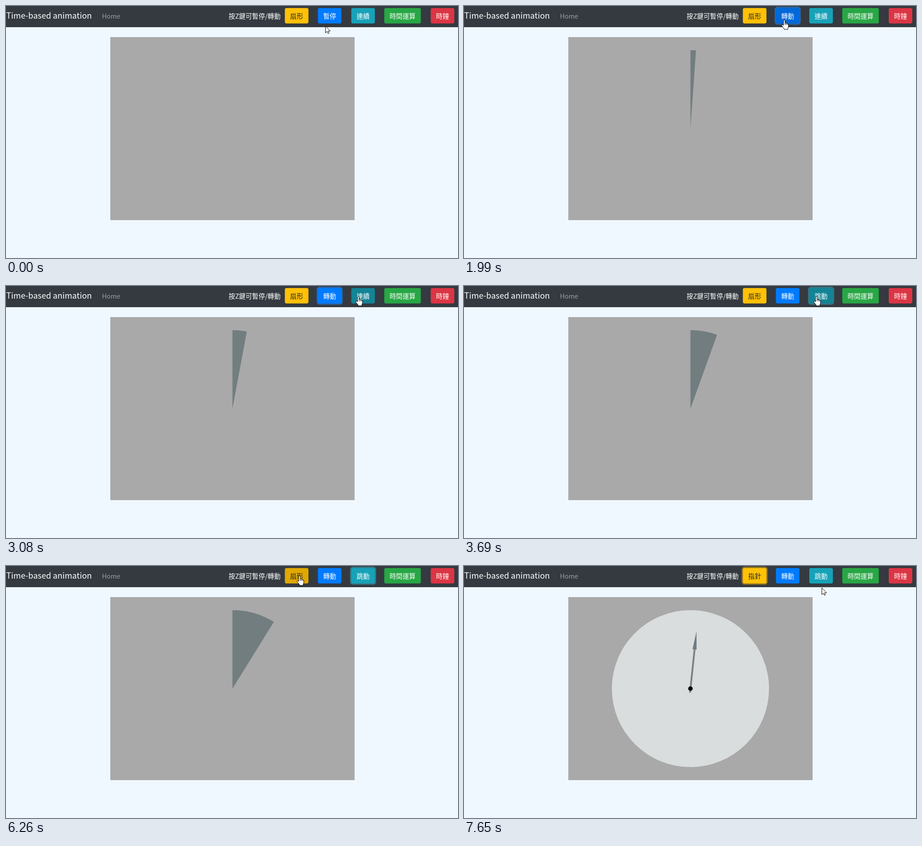
An HTML page that plays this animation: 1001x559 px, repeating every 8 s.

```html
<!DOCTYPE html>
<html lang="zh-Hant">
<head>
<meta charset="utf-8">
<title>Time-based animation</title>
<style>
html, body { margin: 0; width: 100%; height: 100%; overflow: hidden; background: #f0f8ff; }
svg { display: block; width: 1001px; height: 559px; }
text { font: 400 14.4px "Noto Sans CJK TC", "Noto Sans CJK SC", "Noto Sans CJK JP", "Noto Sans", sans-serif; fill: #fff; white-space: pre; }
.medium text, text.medium { font-weight: 500; }
.brand { font-size: 18px; }
.buttons text { text-anchor: middle; }
</style>
</head>
<body>
<svg viewBox="0 0 1001 559">
  <rect width="1001" height="559" fill="#f0f8ff"/>
  <rect width="1001" height="47" fill="#343a40"/>
  <text class="brand" x="0.5" y="28">Time-based animation</text>
  <text x="212.5" y="28" fill-opacity=".5">Home</text>
  <text class="medium" x="493" y="28">按Z鍵可暫停/轉動</text>
  <g class="buttons medium" id="buttons"></g>
  <rect x="231" y="69" width="541" height="406" fill="#a9a9a9"/>
  <path id="sector" fill="#727d80"/>
  <g id="clock">
    <circle cx="501.5" cy="272" r="174" fill="#d9dddd"/>
    <g id="hand">
      <path d="M501.5 281V184" stroke="#828080" stroke-width="4"/>
      <path d="M501.5 144L506 184.500H497Z" fill="#6f7c81"/>
    </g>
    <circle cx="501.5" cy="272" r="5" fill="#000"/>
  </g>
  <g id="cursor" fill="#fff" stroke="#000" stroke-linejoin="round">
    <path id="arrow" d="M.5 .5V15.500L4 12.300L6.200 17L8.500 16L6.300 11.500H11Z"/>
    <path id="pointer" d="M-1.500 12V1.500a1.700 1.700 0 0 1 3.400 0V7q1.600-1.200 3 .6q1.600-.8 2.700 .8q1.800-.4 2 1.600V14q0 2-1.500 4.500V21H0V19.500Q-4 14-5.500 12.500q-.6-2.300 1.400-2Q-2.500 11-1.500 12ZM1.900 7v4M4.900 8v3M7.600 9v2"/>
  </g>
</svg>
<script>
const LOOP = 8000, FADE = 150, TICK = 77.3, FIRST_TICK = 520;
const CX = 501.5, CY = 272, RADIUS = 174;
const TOP = 4.5, HEIGHT = 34.2;
const $ = id => document.getElementById(id);

// fill and ring: [time, value] with a short fade; labels: [time, text] without one
const buttons = [
  { x: 617.6, w: 52.2, ink: '#212529', glow: '222,170,12',
    labels: [[0, '扇形'], [6300, '指針']],
    fill: [[0, 'ffc107'], [5900, 'e0a800'], [6245, 'd39e00'], [6320, 'e0a800'], [6962, 'ffc107']],
    ring: [[0, 0], [6245, 1]] },
  { x: 690.7, w: 52.2, glow: '38,143,255',
    labels: [[0, '暫停'], [1300, '轉動']],
    fill: [[0, '007bff'], [580, '0069d9'], [1205, '0062cc'], [1300, '0069d9'], [2400, '007bff'],
      [5765, '0069d9'], [5880, '007bff'], [7080, '0069d9'], [7365, '007bff']],
    ring: [[0, 0], [1205, 1], [3450, 0]] },
  { x: 764.7, w: 52.2, glow: '58,176,195',
    labels: [[0, '連續'], [3530, '跳動']],
    fill: [[0, '17a2b8'], [2532, '138496'], [3450, '117a8b'], [3530, '138496'], [5715, '17a2b8']],
    ring: [[0, 0], [3450, 1], [6245, 0]] },
  { x: 837.7, w: 81, labels: [[0, '時間運算']], fill: [[0, '28a745']], ring: [[0, 0]] },
  { x: 940.6, w: 52.2, labels: [[0, '時鐘']], fill: [[0, 'dc3545']], ring: [[0, 0]] }
];

const mousePath = [
  [0, 707, 44], [480, 707, 44], [560, 709, 33], [640, 709, 31],
  [2200, 709, 31], [2620, 780, 23],
  [5620, 780, 23], [5699, 772, 22], [5960, 650, 22],
  [6850, 650, 22], [7625, 792, 48]
];

const mix = (a, b, k) => a + (b - a) * k;
const clamp = k => Math.max(0, Math.min(1, k));
const rgb = hex => [0, 2, 4].map(i => parseInt(hex.slice(i, i + 2), 16));
const lastIndex = (steps, t) => steps.filter(s => s[0] <= t).length - 1;

function fade(steps, t, blend) {
  const i = lastIndex(steps, t);
  const previous = steps[Math.max(0, i - 1)][1];
  return blend(previous, steps[i][1], clamp((t - steps[i][0]) / FADE));
}

function mixColor(a, b, k) {
  const to = rgb(b);
  return `rgb(${rgb(a).map((v, i) => Math.round(mix(v, to[i], k)))})`;
}

function mouseAt(t) {
  const i = lastIndex(mousePath, t);
  const a = mousePath[i], b = mousePath[i + 1] || a;
  const k = a === b ? 0 : (t - a[0]) / (b[0] - a[0]);
  return [mix(a[1], b[1], k), mix(a[2], b[2], k)];
}

function add(tag, attrs) {
  const el = document.createElementNS('http://www.w3.org/2000/svg', tag);
  return $('buttons').appendChild(set(el, attrs));
}

function set(el, attrs) {
  for (const name in attrs) el.setAttribute(name, attrs[name]);
  return el;
}

for (const b of buttons) {
  b.halo = add('rect', { fill: `rgba(${b.glow || '0,0,0'},.5)` });
  b.box = add('rect', { x: b.x, y: TOP, width: b.w, height: HEIGHT, rx: 3.6 });
  b.text = add('text', { x: b.x + b.w / 2, y: 28 });
  b.text.style.fill = b.ink || '#fff';
}

function drawButton(b, t) {
  const ring = fade(b.ring, t, mix), spread = 2.88 * ring;
  set(b.halo, {
    x: b.x - spread, y: TOP - spread, rx: 3.6 + spread, opacity: ring,
    width: b.w + 2 * spread, height: HEIGHT + 2 * spread
  });
  set(b.box, { fill: fade(b.fill, t, mixColor) });
  b.text.textContent = b.labels[lastIndex(b.labels, t)][1];
}

// Smooth 6° per second first, then one 6° jump each second
function sectorAngle(t) {
  if (t < 3650) return Math.max(0, (t - 1315) * 0.006);
  return 19.8 + 6 * Math.floor((t - 3650) / 1010);
}

function drawSector(t) {
  const a = sectorAngle(t) * Math.PI / 180;
  const x = CX + RADIUS * Math.sin(a), y = CY - RADIUS * Math.cos(a);
  set($('sector'), { d: a ? `M${CX} ${CY}V${CY - RADIUS}A${RADIUS} ${RADIUS} 0 0 1 ${x} ${y}Z` : '' });
}

function drawMouse(t) {
  const [x, y] = mouseAt(t);
  const over = y > TOP && y < TOP + HEIGHT && buttons.some(b => x > b.x && x < b.x + b.w);
  set($('cursor'), { transform: `translate(${Math.round(x)} ${Math.round(y)})` });
  $('arrow').style.display = over ? 'none' : '';
  $('pointer').style.display = over ? '' : 'none';
}

function render(time) {
  const t = Math.max(0, FIRST_TICK + Math.floor((time - FIRST_TICK) / TICK) * TICK);
  const clockShown = t >= 6300;
  buttons.forEach(b => drawButton(b, t));
  drawSector(t);
  $('sector').style.display = clockShown ? 'none' : '';
  $('clock').style.display = clockShown ? '' : 'none';
  set($('hand'), { transform: `rotate(${t >= 7300 ? 6 : 0} ${CX} ${CY})` });
  drawMouse(t);
}

const start = performance.now();
function frame() {
  render((performance.now() - start) % LOOP);
  requestAnimationFrame(frame);
}
frame();
</script>
</body>
</html>
```
